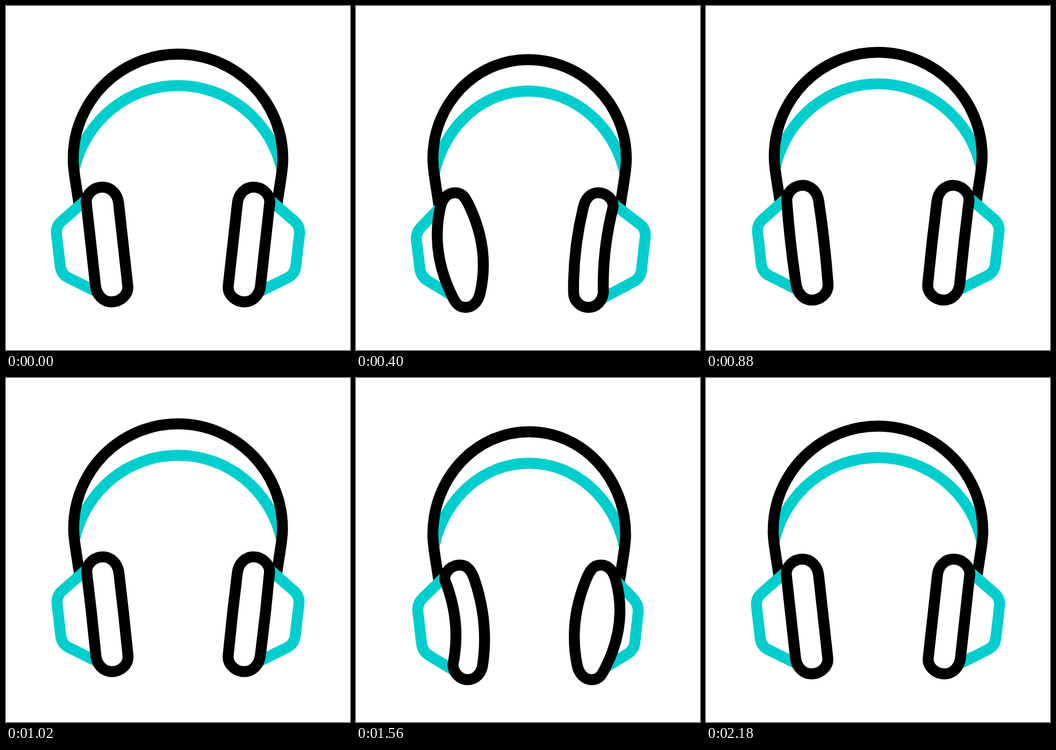
An HTML page for the animation above (2400 ms loop, 640 px wide and 640 px high).

```html
<!DOCTYPE html>
<html lang="en">
<head>
<meta charset="utf-8">
<title>Headphones</title>
<style>
  html, body { margin: 0; width: 100%; height: 100%; overflow: hidden; background: #fff; }
  svg { display: block; width: 100%; height: 100%; }
  path { fill: none; stroke-width: 20.4; stroke-linejoin: round; }
  .dark { stroke: #000; }
  .teal { stroke: #00cece; }
  .pad { fill: #fff; }
</style>
</head>
<body>
<svg viewBox="0 0 640 640">
  <g id="all">
    <path id="strap" class="teal"/>
    <path id="band" class="dark"/>
    <path id="cupL" class="teal"/>
    <path id="cupR" class="teal"/>
    <path id="padL" class="dark pad"/>
    <path id="padR" class="dark pad"/>
  </g>
</svg>
<script>
const LOOP = 2400, WIDTH = 640;
const ROUND = 0.5523; // handle length of a quarter circle

// Both sides are measured from their own stage edge, so a side reads the same left or right.
// side: band's widest x; padX: pad axis, top and bottom; bow: bend of the pad's
// outer and inner edge; cup: upper and lower corner.
const plain = { side: 125, padX: [179.5, 196.5], bow: [0, 0], cup: [[92.3, 410], [102.6, 499]] };

const rest = {
  top: 89.5, center: 320, waist: 284.5, padY: [367, 520.5], radius: 30,
  left: plain, right: plain
};
const turnA = {
  top: 99.7, center: 320, waist: 284, padY: [375, 533], radius: 27.7,
  left: { side: 143, padX: [184.5, 203.5], bow: [-13.5, 13.5], cup: [[110.6, 422], [120.7, 503.5]] },
  right: { side: 137, padX: [189.5, 207.5], bow: [5.5, 5], cup: [[100.2, 415], [110.5, 506]] }
};
const turnB = {
  top: 100, center: 322, waist: 291, padY: [375.7, 533.5], radius: 27.7,
  left: { side: 143, padX: [193, 208], bow: [12, 9.5], cup: [[113.4, 420], [123.7, 508.8]] },
  right: { side: 138.5, padX: [184.5, 201], bow: [-15, 12], cup: [[113.6, 422], [122.7, 506]] }
};

// Blends numbers, lists and objects alike.
function mix(base, a, b, wa, wb) {
  if (typeof base === "number") return base + wa * (a - base) + wb * (b - base);
  const out = Array.isArray(base) ? [] : {};
  for (const key in base) out[key] = mix(base[key], a[key], b[key], wa, wb);
  return out;
}

// Cubic ease with flat ends; x1 and x2 are the handle positions.
function ease(u, x1 = 1 / 3, x2 = 2 / 3) {
  if (u <= 0) return 0;
  if (u >= 1) return 1;
  let low = 0, high = 1;
  for (let i = 0; i < 30; i++) {
    const s = (low + high) / 2, r = 1 - s;
    if (3 * r * r * s * x1 + 3 * r * s * s * x2 + s * s * s < u) low = s;
    else high = s;
  }
  return low * low * (3 - 2 * low);
}

// Turn to one side, return with a small lift, turn to the other side, settle.
const TURN_A = 540, LIFT = 950, TURN_B = 1490, REST = 2180;
const PEAK_A = 1.11, PEAK_B = 1.03, LIFT_Y = -5;

function motion(t) {
  const out = ease(t / TURN_A, 0.3, 0.5);
  const back = ease((t - TURN_A) / (LIFT - TURN_A), 0.6, 0.67);
  const turn = ease((t - LIFT) / (TURN_B - LIFT));
  const settle = ease((t - TURN_B) / (REST - TURN_B));
  return {
    pose: mix(rest, turnA, turnB, PEAK_A * (out - back), PEAK_B * (turn - settle)),
    lift: LIFT_Y * (back - turn)
  };
}

const mirror = list => list.map(([x, y]) => [WIDTH - x, y]);
const at = p => p[0].toFixed(2) + " " + p[1].toFixed(2);
const curve = list => "M" + at(list[0]) + "C" + list.slice(1).map(at).join(" ");

// Joins a left half and a mirrored right half at the crown.
function arch(half, pose) {
  const right = mirror(half(pose.right, pose, WIDTH - pose.center));
  return curve(half(pose.left, pose, pose.center).concat(right.reverse().slice(1)));
}

function bandHalf({ side }, { top, waist }, center) {
  return [
    [side + 11.5, waist + 88], [side + 2.5, waist + 31.5], [side, waist + 15.5], [side, waist],
    [side, waist - ROUND * (waist - top)], [center - ROUND * (center - side), top], [center, top]
  ];
}

function strapHalf({ side }, { top }, center) {
  const x = side + 2.5, crown = top + 58.5, y = crown + 154, w = center - x;
  return [[x, y], [x + 0.11 * w, y - 0.587 * (y - crown)], [center - 0.476 * w, crown], [center, crown]];
}

// A capsule whose long edges bend; where an edge bulges, the caps follow its slope.
function padOutline({ padX: [x0, x1], bow }, { padY: [y0, y1], radius: r }) {
  const dx = x1 - x0, dy = y1 - y0, h = ROUND * r;
  const edge = (sign, bend) => {
    const bulge = sign * bend > 0 ? 4 * bend : 0, x = x0 + sign * r;
    const along = k => [x + dx * k + bend * 4 / 3, y0 + dy * k];
    return [
      [x0 + sign * h, y0 - r], [x - h * (dx + bulge) / dy, y0 - h], [x, y0],
      along(1 / 3), along(2 / 3),
      [x + dx, y1], [x + dx + h * (dx - bulge) / dy, y1 + h], [x1 + sign * h, y1 + r]
    ];
  };
  const crown = [x0, y0 - r];
  return [crown, ...edge(1, bow[1]), [x1, y1 + r], ...edge(-1, bow[0]).reverse(), crown];
}

const toward = (p, q, d) => {
  const k = d / Math.hypot(q[0] - p[0], q[1] - p[1]);
  return [p[0] + (q[0] - p[0]) * k, p[1] + (q[1] - p[1]) * k];
};

// Open shell from pad top to pad bottom; its ends are tucked under the pad.
function cupPoints({ padX, bow, cup }, { padY, radius }) {
  const bulge = Math.max(0, -bow[0]), inset = radius - 6;
  return [
    [padX[0] - inset, padY[0] - 12 + 0.4 * bulge], ...cup,
    [padX[1] - inset, padY[1] + 13 - 0.4 * bulge]
  ];
}

function cupPath([a, b, c, d]) {
  const corner = (p, q, s) => "L" + at(toward(q, p, 15)) + "Q" + at(q) + " " + at(toward(q, s, 15));
  return "M" + at(a) + corner(a, b, c) + corner(b, c, d) + "L" + at(d);
}

const find = id => document.getElementById(id);
const draw = (id, d) => find(id).setAttribute("d", d);

function render(t) {
  const { pose, lift } = motion(t);
  find("all").setAttribute("transform", `translate(0 ${lift.toFixed(2)})`);
  draw("strap", arch(strapHalf, pose));
  draw("band", arch(bandHalf, pose));
  for (const [key, part, place] of [["L", pose.left, p => p], ["R", pose.right, mirror]]) {
    draw("cup" + key, cupPath(place(cupPoints(part, pose))));
    draw("pad" + key, curve(place(padOutline(part, pose))) + "Z");
  }
}

const start = performance.now();
function tick() {
  render((performance.now() - start) % LOOP);
  requestAnimationFrame(tick);
}
tick();
</script>
</body>
</html>
```
